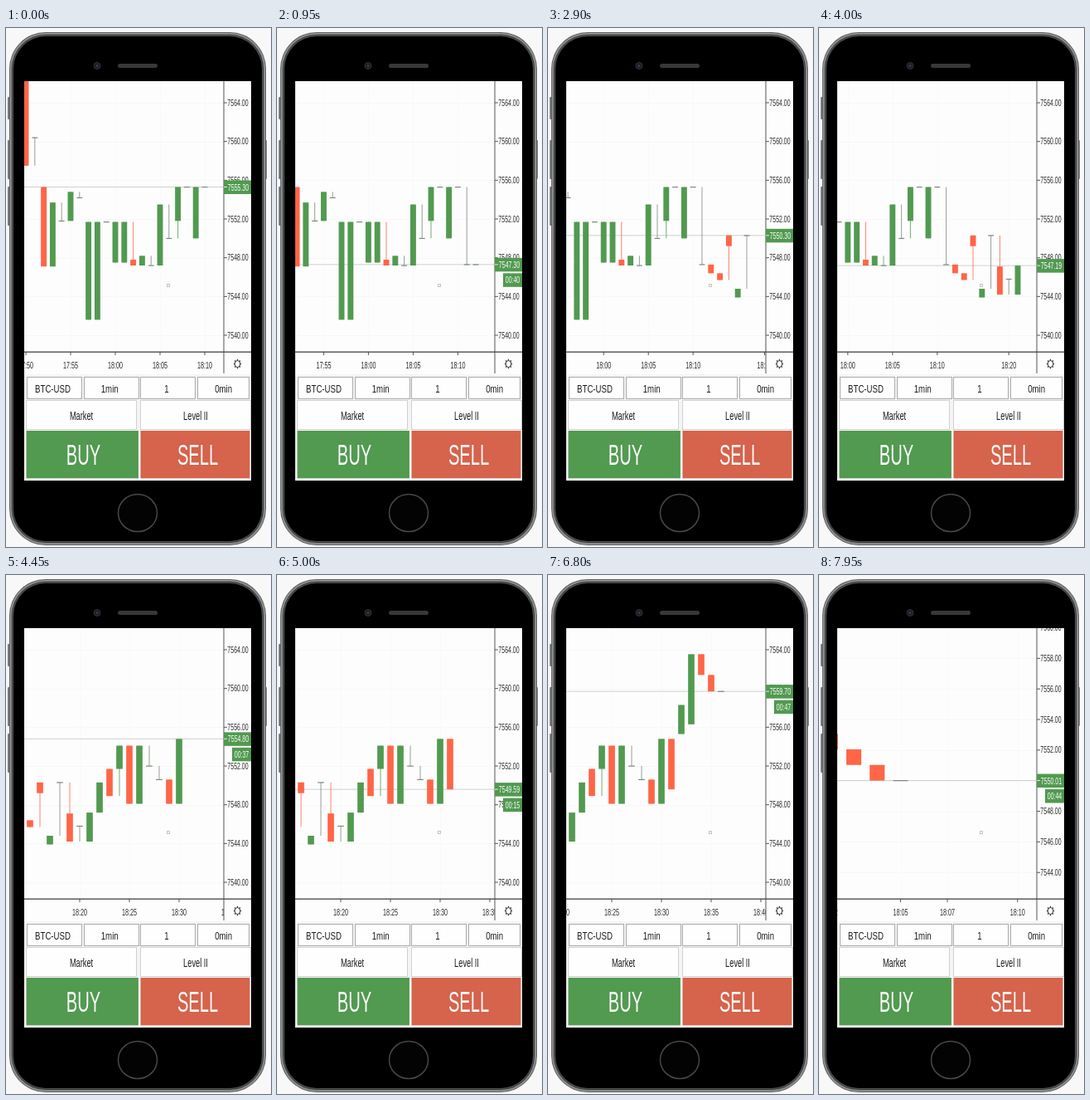
Recreate the animation shown at these times as an HTML page with a canvas. Size 320 px wide and 625 px high, loop 8 s.

```html
<!DOCTYPE html>
<html lang="en">
<head>
<meta charset="utf-8">
<title>Trading chart on a phone</title>
<style>
  html, body { margin: 0; width: 100%; height: 100%; overflow: hidden; background: #f8f8f8; }
  canvas { display: block; width: 320px; height: 625px; }
</style>
</head>
<body>
<canvas id="stage"></canvas>
<script>
const LOOP = 8000;
const GREEN = '#519a50', RED = '#ff6546', FLAT = '#7c8a7b';
const LEFT = 22, TOP = 64, RIGHT = 296, BOTTOM = 545;
const AXIS_X = 263, AXIS_Y = 390;

const canvas = document.getElementById('stage');
const ctx = canvas.getContext('2d');
const ratio = window.devicePixelRatio || 1;
canvas.width = 320 * ratio;
canvas.height = 625 * ratio;

// Key prices above 7500, one entry per bar from 17:50 on:
// a close (opening at the previous close), [open, close] after a gap, or [price] for a flat bar.
const dip = [41.6, 51.7], rebound = [47.5, 51.7];
const keyPrices = [
  [66.5, 57.5], [60.4], [55.3, 47.1], 53.7, [51.8], 54.8, [54.2], dip, dip, [51.7],
  rebound, rebound, [47.8, 47.2], 48.2, [47.2], 53.5, [50], [51.8, 55.3], [55.3], [50, 55.3],
  [55.3], [47.3], 46.4, 45.7, [50.31, 49.2], [43.9, 44.8], [50.3], [47.1, 44.2], [45.8], [44.2, 47.19],
  50.3, [51.7, 48.9], [51.7, 54.1], 48.1, 54.1, [52], [50.6], 48.1, 54.8, 49.59,
  [55.3, 58.3], [56.3, 63.54], 61.4, 59.7, 60.8, 60
];

// Wicks reach back to the previous close, unless a body opens after a wide gap.
function makeBar(open, close, previous) {
  const reach = open === close || Math.abs(previous - open) < 5 ? previous : open;
  return { open, close, high: Math.max(open, close, reach), low: Math.min(open, close, reach) };
}

let lastClose = keyPrices[0][0];
const history = keyPrices.map(entry => {
  const [open, close = open] = Array.isArray(entry) ? entry : [lastClose, entry];
  const bar = makeBar(open, close, lastClose);
  lastClose = close;
  return bar;
});

const slide = i => Math.max(50.01, 54.09 - 1.02 * i);

// The newest bar of a scene stays at liveX; it is bar `live` at `start`.
const wide = { first: -10, barAt: i => history[i + 10], topPrice: 64, topY: 90, unit: 11.667, tick: 4, every: 5 };
const scenes = [
  { ...wide, until: 4294, start: -35, barMs: 420, live: 10, liveX: 240, step: 10.8, countdownEnd: 0.6 },
  { ...wide, until: 7380, start: 4294, barMs: 403, live: 28, liveX: 209, step: 12, countdownEnd: 0.8 },
  { first: 2, barAt: i => makeBar(slide(i - 1), slide(i), slide(i - 1)),
    topPrice: 60, topY: 63.5, unit: 18.42, tick: 2, every: 2.5,
    until: LOOP, start: 6952, barMs: 440, live: 3, liveX: 98.5, step: 28.25, countdownEnd: 0.8 }
];

function rect(x, y, w, h, color) {
  ctx.fillStyle = color;
  ctx.fillRect(x, y, w, h);
}

function frame(x, y, w, h, color) {
  rect(x, y, w, h, '#fefefe');
  ctx.strokeStyle = color;
  ctx.lineWidth = 1;
  ctx.strokeRect(x + 0.5, y + 0.5, w - 1, h - 1);
}

function rounded(x, y, w, h, r, color) {
  ctx.beginPath();
  ctx.roundRect(x, y, w, h, r);
  ctx.fillStyle = color;
  ctx.fill();
}

function ellipse(x, y, rx, ry, fill, stroke, width = 1) {
  ctx.beginPath();
  ctx.ellipse(x, y, rx, ry, 0, 0, Math.PI * 2);
  if (fill) { ctx.fillStyle = fill; ctx.fill(); }
  if (stroke) { ctx.strokeStyle = stroke; ctx.lineWidth = width; ctx.stroke(); }
}

// The whole screen is narrowed, so its lettering is condensed too.
function text(str, x, y, size, color, condense = 0.7) {
  ctx.save();
  ctx.translate(x, y);
  ctx.scale(condense, 1);
  ctx.font = `${size}px "Liberation Sans", Arial, sans-serif`;
  ctx.textAlign = 'center';
  ctx.fillStyle = color;
  ctx.fillText(str, 0, size * 0.36);
  ctx.restore();
}

function drawPhone() {
  rect(0, 0, 320, 625, '#f8f8f8');
  for (const [y, h] of [[83, 27], [135, 47], [191, 47]]) rounded(2, y, 4, h, 1, '#77797b');
  rounded(311, 135, 4, 47, 1, '#77797b');
  const bezel = ['#5d5f61', '#98999b', '#7b7d7f', '#3a3b3d', '#515254', '#000'];
  bezel.forEach((color, k) => rounded(4 + k, 5 + k, 310 - 2 * k, 618 - 2 * k, 44 - k, color));
  ellipse(110, 45.5, 4, 4, '#1c1c22', '#33333a');
  ellipse(110, 45.5, 1.5, 1.5, '#3b3b55');
  rounded(135, 43, 48, 5, 2.5, '#38383a');
  ellipse(159, 584, 23.5, 22.5, '#030303', '#48484a', 1.5);
}

function drawGear(x, y) {
  ctx.strokeStyle = '#333';
  ctx.lineWidth = 1.2;
  for (let k = 0; k < 8; k++) {
    const c = Math.cos(k * Math.PI / 4), s = Math.sin(k * Math.PI / 4);
    ctx.beginPath();
    ctx.moveTo(x + c * 3.4, y + s * 4);
    ctx.lineTo(x + c * 4.6, y + s * 5.8);
    ctx.stroke();
  }
  ellipse(x, y, 3.3, 4, null, '#333');
}

function drawPanel() {
  rect(LEFT, 417, RIGHT - LEFT, BOTTOM - 417, '#f5f5f5');
  ['BTC-USD', '1min', '1', '0min'].forEach((label, k) => {
    const x = 25 + k * 68.7;
    frame(Math.round(x), 420, k < 3 ? 67 : 63, 27, '#aaa');
    text(label, x + 31.5, 434, 13, '#1c1c1c', 0.74);
  });
  const halves = [
    { x: 24, label: 'Market', action: 'BUY', color: GREEN },
    { x: 162, label: 'Level II', action: 'SELL', color: '#d6634b' }
  ];
  for (const { x, label, action, color } of halves) {
    frame(x, 448, 134, 36, '#d0d0d0');
    text(label, x + 67, 467, 14, '#1c1c1c', 0.66);
    rect(x + 0.5, 485, 136 - x / 40, 57.5, color);
    text(action, x + 69.5, 513, 35, '#fafafa', 0.575);
  }
  rect(LEFT, 542.5, RIGHT - LEFT, 2.5, '#fff');
}

// Price steps of a bar: open, the extreme against its direction, the other one, close.
function pricesSeen({ open, close, high, low }, progress) {
  const extremes = close >= open ? [low, high] : [high, low];
  const count = [0, 0.27, 0.36, 0.55].filter(limit => progress >= limit).length;
  return [open, ...extremes, close].slice(0, count);
}

function drawCandle(x, prices, width, toY) {
  const open = prices[0], close = prices[prices.length - 1];
  const flat = open === close;
  const color = flat ? FLAT : close > open ? GREEN : RED;
  const high = toY(Math.max(...prices)), low = toY(Math.min(...prices));
  const top = toY(Math.max(open, close));
  ctx.globalAlpha = 0.8;
  rect(x - 0.5, high, 1, low - high, color);
  ctx.globalAlpha = 1;
  rect(x - width / 2, flat ? top - 0.5 : top, width, flat ? 1.2 : Math.abs(toY(open) - toY(close)), color);
}

// Time labels; the two minutes before 18:16 have no bars.
function timeLabels(scene, toX) {
  const labels = [];
  for (let m = -10; m <= 40; m += scene.every) {
    const minute = Math.floor(m);
    if (minute === 15) continue;
    const hour = minute < 0 ? 17 : 18;
    const digits = String((minute + 60) % 60).padStart(2, '0');
    labels.push({ x: toX(minute > 15 ? minute - 2 : minute), label: `${hour}:${digits}` });
  }
  return labels;
}

function drawPriceTag(price, y, progress, countdownEnd) {
  rect(AXIS_X, y - 8, 33, 16.5, GREEN);
  rect(AXIS_X, y - 0.5, 4, 1, '#dfeadf');
  text((7500 + price).toFixed(2), 280.5, y + 0.5, 10, '#fff');
  if (progress < 0.2 || progress > countdownEnd) return;
  const seconds = Math.ceil(60 - progress * 60 - 1e-6);
  rect(273, y + 10.5, 23, 16.5, GREEN);
  text(`00:${String(seconds).padStart(2, '0')}`, 284.5, y + 19, 10, '#fff');
}

function drawChart(time) {
  const scene = scenes.find(s => time < s.until);
  const elapsed = (time - scene.start) / scene.barMs;
  const live = scene.live + Math.floor(elapsed);
  const progress = elapsed % 1;
  const toX = i => scene.liveX + (i - live) * scene.step;
  const toY = p => scene.topY + (scene.topPrice - p) * scene.unit;
  const seen = i => pricesSeen(scene.barAt(i), i === live ? progress : 1);
  const price = seen(live).pop();
  const priceY = toY(price);
  const times = timeLabels(scene, toX);
  const ticks = [];
  for (let p = scene.topPrice; toY(p) < AXIS_Y - 8; p -= scene.tick) ticks.push(p);

  rect(LEFT, TOP, RIGHT - LEFT, 353, '#fdfdfd');
  ctx.save();
  ctx.beginPath();
  ctx.rect(LEFT, TOP, AXIS_X - LEFT, 353);
  ctx.clip();
  for (const p of ticks) rect(LEFT, Math.round(toY(p)), 241, 1, '#f7f7f7');
  for (const { x } of times) rect(Math.round(x), TOP, 1, AXIS_Y - TOP, '#f9f9f9');
  rect(LEFT, priceY - 0.5, 241, 1, '#ccd2cc');
  for (let i = scene.first; i <= live; i++) drawCandle(toX(i), seen(i), scene.step * 0.64, toY);
  ctx.strokeStyle = '#c4c4c4';
  ctx.lineWidth = 1;
  ctx.strokeRect(194.5, 308.5, 3, 3);
  for (const { x, label } of times) {
    rect(x - 0.5, AXIS_Y, 1, 4, '#555');
    text(label, x, 406, 10, '#2a2a2a', 0.72);
  }
  ctx.restore();

  rect(AXIS_X - 0.5, TOP, 1, 352, '#555');
  rect(LEFT, AXIS_Y - 0.5, RIGHT - LEFT, 1.3, '#444');
  for (const p of ticks) {
    rect(AXIS_X, toY(p) - 0.5, 4, 1, '#555');
    text((7500 + p).toFixed(2), 280, toY(p), 10, '#2a2a2a');
  }
  drawPriceTag(price, priceY, progress, scene.countdownEnd);
  drawGear(279.5, 404.5);
}

function draw(now) {
  ctx.setTransform(ratio, 0, 0, ratio, 0, 0);
  drawPhone();
  ctx.save();
  ctx.beginPath();
  ctx.rect(LEFT, TOP, RIGHT - LEFT, BOTTOM - TOP);
  ctx.clip();
  drawChart(now % LOOP);
  drawPanel();
  ctx.restore();
}

const begin = performance.now();
function tick() {
  draw(performance.now() - begin);
  requestAnimationFrame(tick);
}
tick();
</script>
</body>
</html>
```
